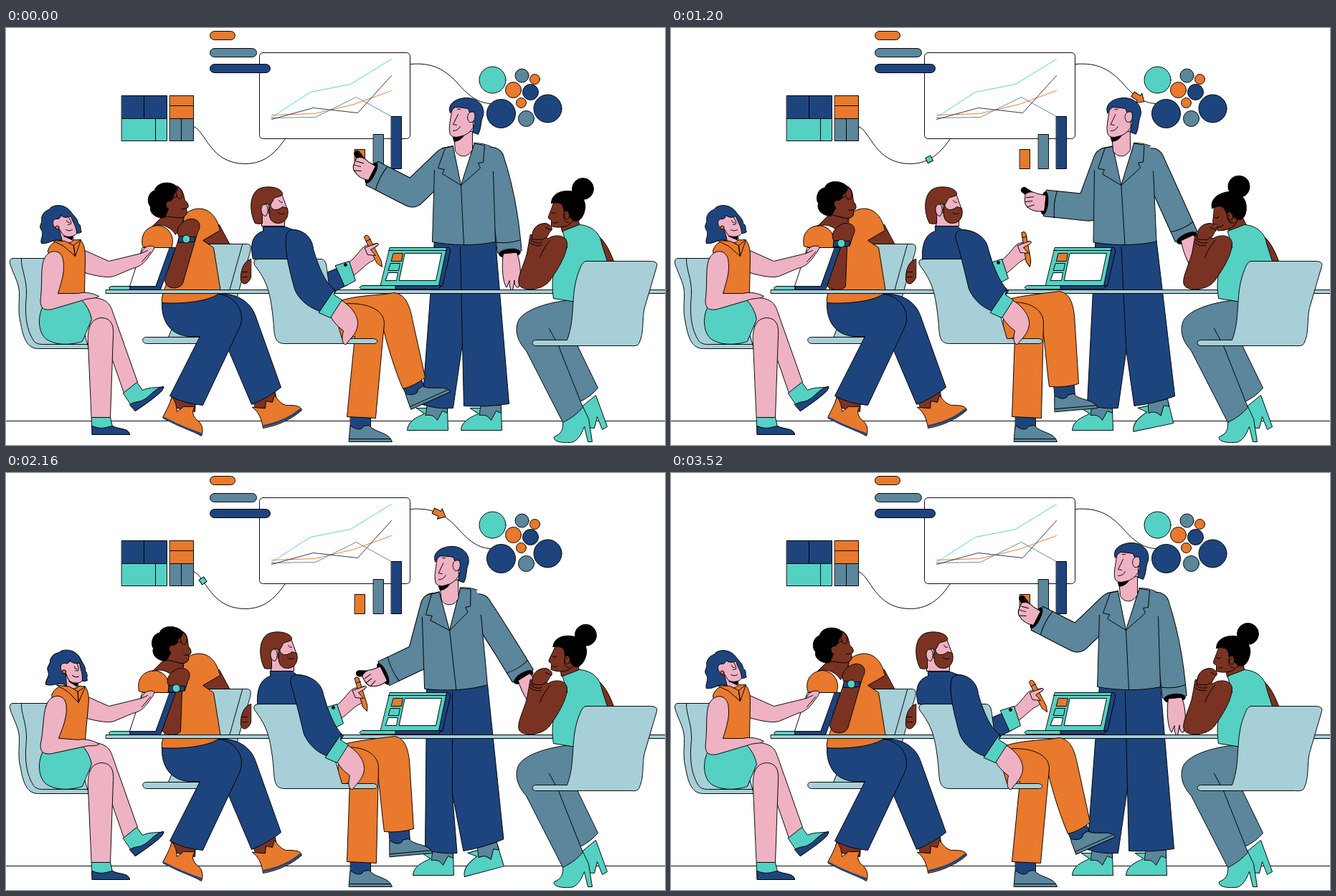
These frames come from a looping animation (919x582 px, 3600 ms). An HTML page:

```html
<!DOCTYPE html>
<html lang="en">
<head>
<meta charset="utf-8">
<title>Meeting</title>
<style>
html, body { margin: 0; height: 100%; overflow: hidden; background: #fff }
svg { display: block; width: 100vw; height: 100vh; stroke: #000; stroke-width: .95; stroke-linejoin: round; stroke-linecap: round }
.n { fill: #1e447d } .t { fill: #54d1c3 } .o { fill: #e8792d } .s { fill: #5b869b }
.c { fill: #a7cfd7 } .p { fill: #eeb2c3 } .b { fill: #7a3322 } .k { fill: #000 } .w { fill: #fff }
.l { fill: none } .x { stroke: none }
.sleeve { fill: none }
.sleeve path + path { stroke: #5b869b }
</style>
</head>
<body>
<svg viewBox="-.5 -.5 919 582">
<defs>
  <g id="shoe">
    <path class="n" d="M-14 -6H14V16H-14Z"/>
    <path class="s" d="M-15 14L-14 9C-8 15 2 17 4 10L12 9C20 20 40 18 44 32H-16Z"/>
    <path class="l" d="M-16 28H41"/>
  </g>
  <g id="flat">
    <path class="t" d="M-28 0H15L16 31H-41C-40 18 -28 13 -17 8Z"/>
    <path class="s" d="M-13 -4H15V7L8 4L1 17C-3 12 -5 9 -15 10Z"/>
  </g>
</defs>
<path d="M-1 548H919"/>

<!-- charts -->
<rect class="w" x="353" y="34" width="210" height="120" rx="5"/>
<rect class="o" x="284" y="4" width="35" height="12" rx="6"/>
<rect class="s" x="284" y="28" width="65" height="12" rx="6"/>
<rect class="n" x="284" y="50" width="84" height="12" rx="6"/>
<g class="l">
  <path stroke="#54d1c3" d="M370 124L424 89L480 78L537 43"/>
  <path stroke="#e8792d" d="M370 121L430 119L485 106L537 87"/>
  <path stroke="#5b869b" d="M370 125L431 124L488 96L537 123"/>
  <path stroke="#2b2f55" d="M370 127L428 111L490 118L537 66"/>
  <path id="track1" d="M261 137C278 143 284 189 333 189C362 189 377 171 389 154"/>
  <path id="track2" d="M563 50C596 47 612 59 627 74C642 91 655 104 675 105"/>
</g>
<path class="o" d="M486 169h14v27h-14z"/>
<path class="s" d="M512 148h14v48h-14z"/>
<path class="n" d="M537 123h14v73h-14z"/>
<path class="n" d="M161 94h63v32h-63zM192 94v32"/>
<path class="t" d="M161 126h63v31h-63zM208 126v31"/>
<path class="o" d="M228 94h33v32h-33zM228 108h33"/>
<path class="s" d="M228 126h33v31h-33zM244 126v31"/>
<g class="n"><circle cx="690" cy="119" r="20"/><circle cx="755" cy="112" r="19.5"/><circle cx="731" cy="89" r="11"/></g>
<g class="o"><circle cx="737" cy="71" r="7"/><circle cx="707" cy="86" r="11"/><circle cx="718" cy="104" r="7"/></g>
<g class="s"><circle cx="719" cy="66" r="9.5"/><circle cx="725" cy="126" r="11"/></g>
<circle class="t" cx="678" cy="72" r="18.500"/>
<path id="box" class="t" d="M-4 -4h8v8h-8z"/>
<path id="arrow" class="o" d="M-9 -4H1V-8L10 0L1 8V4H-9Z"/>

<!-- presenter -->
<use id="flatL" href="#flat"/><use id="flatR" href="#flat"/>
<path id="pants" class="n"/>
<g id="armL"><g class="sleeve"><path stroke-width="38"/><path stroke-width="36"/></g>
  <g class="end">
    <path class="s" d="M-15 -18.500H0Q4 0 0 18.500H-15Q-11 0 -15 -18.500Z"/>
    <ellipse class="k" cx="1" rx="5" ry="16"/>
    <path class="k" stroke-width="9" d="M17 8L31 15"/>
    <path class="p" d="M0 -11C10 -14 18 -12 24 -8C30 -4 28 4 29 9C24 15 18 14 12 12L0 11Z"/>
    <path class="l" d="M28 -1L18 1M27 5L17 7M24 -8L15 -4"/>
  </g>
</g>
<g id="armR"><g class="sleeve"><path stroke-width="35"/><path stroke-width="33"/></g>
  <g class="end">
    <path class="s" d="M-15 -17H0Q4 0 0 17H-15Q-11 0 -15 -17Z"/>
    <ellipse class="k" cx="2" rx="6" ry="15"/>
    <path class="p" d="M2 -10C20 -15 38 -12 50 -8C52 -3 44 -2 40 -3L54 1C55 5 44 5 40 4L49 9C44 13 22 14 2 9Z"/>
  </g>
</g>
<g id="jacket">
  <path class="w x" d="M622 165L634 219L653 160Z"/>
  <path class="s x" d="M610 167L623 164L634 219L652 160L674 164C679 175 679 185 679 200L682 298C655 304 620 303 594 298L597 200C597 185 603 178 610 167Z"/>
  <path class="l" d="M597 198L594 298C620 303 655 304 682 298L679 200M608 167L623 164M652 160Q666 160 676 165M634 219L638 302"/>
  <path class="s" d="M612 167L602 195L611 197L608 203L634 219L623 165ZM653 161L667 163L665 187L658 188L661 195L634 219Z"/>
</g>
<g id="head">
  <path class="p" d="M624 148L626 171C632 182 645 180 650 169V144Z"/>
  <path class="k" d="M623 152Q635 150 640 145Q637 156 625 158Z"/>
  <path class="p" d="M622 110C620 125 617 135 618 143C618 152 626 153 632 151Q645 149 651 138V110Z"/>
  <path class="n" d="M619 118C614 105 628 97 642 97C656 97 668 107 665 122C661 130 663 138 658 148L650 145L653 132C648 122 646 118 644 112Q632 110 626 110Q621 113 619 118Z"/>
  <path class="p" d="M652 117C644 114 640 125 646 131C654 133 655 120 652 117Z"/>
  <path class="l" d="M630 120L623 134L628 135M623 143Q630 143 633 137M629 113l4 0"/>
</g>

<!-- man in the orange shirt -->
<path class="b" d="M268 285L297 274L313 304H280Z"/>
<path class="c" d="M276 301H336C342 302 341 306 340 312L323 370C316 410 305 432 290 440H196C189 440 188 431 195 431H226L250 372Z"/>
<path class="l" d="M329 302L310 370M226 431H290"/>
<path class="b" d="M341 322C330 325 326 340 327 352C331 361 338 355 341 348ZM328 340l8 0M329 347l7 0"/>
<path class="b" d="M343 515L375 508L378 526L348 532ZM232 510L264 520L263 535L228 528Z"/>
<g class="o">
  <path d="M231 514C228 525 222 535 218 543C235 552 260 562 272 569C276 560 272 550 265 546C260 540 258 535 263 528L247 528L238 535Q238 524 231 514Z"/>
  <path d="M343 529C352 535 356 545 358 558C375 555 395 548 412 533C411 526 400 526 390 526C383 524 378 518 374 512L371 522L362 520L361 530Z"/>
</g>
<path class="l" stroke="#1e447d" stroke-width="3" d="M220 544Q245 557 271 566M359 555Q390 549 410 532"/>
<path class="n" d="M290 371C322 368 340 382 347 400L383 501Q365 516 342 525L306 440Z"/>
<path class="n" d="M217 383C216 405 226 428 255 430L270 430L228 513Q248 524 274 526L325 418C336 393 315 372 296 371Z"/>
<path class="o" d="M217 383C214 370 232 340 243 306L248 260C264 246 290 247 298 282L274 296L289 306L299 368C285 382 240 385 217 383Z"/>
<path id="sleeve2" class="o" d="M190 304C186 286 197 276 211 275C224 276 232 286 232 298L230 310Z"/>
<path class="b" d="M204 276L224 256L247 262C246 276 240 282 236 288C228 276 216 272 204 276Z"/>
<path class="b" data-move="man2" d="M241 293L263 297L246 356C240 366 222 364 221 352Z" data-to="M228 302L245 304L243 360C238 368 217 366 216 356Z"/>
<g id="fist2">
  <path class="b" d="M241 291C233 280 246 268 256 266C268 265 273 274 267 284L263 297Z"/>
  <path class="n" d="M241 290L263 291L262 298L240 299Z"/>
  <circle class="t" cx="251" cy="294" r="5.500"/>
</g>
<g id="head2">
  <path class="b" d="M222 240C222 230 230 222 238 220C246 224 247 232 249 240C256 246 254 250 251 252C254 262 246 266 236 264L220 262Z"/>
  <path class="k" d="M234 218C222 212 208 218 207 226C196 230 196 244 201 249C199 260 212 266 221 264L226 252C220 248 222 240 229 241C234 238 232 230 238 226Q239 220 234 218Z"/>
  <path class="l" d="M231 238L238 234M239 222C246 222 248 236 242 238C236 237 235 226 239 222M244 252Q248 253 251 251"/>
</g>

<rect class="c" x="139" y="365" width="785" height="5"/>

<!-- laptops -->
<path class="w" d="M190 306H230L214 361H172Z"/>
<path class="n" d="M228 306H236L215 365H172V360H208Z"/>
<path class="t" d="M172 360H146Q141 362 145 365H172Z"/>
<path class="n" d="M612 306H617Q620 308 619 312L608 360H600Z"/>
<path class="t" d="M535 306H614L603 359H522Z"/>
<path class="w" d="M556 314H607L599 352H548ZM533 341H546L544 352H529Z"/>
<path class="o" d="M540 314H553L551 325H537Z"/>
<path class="l" d="M536 328H549L547 338H533ZM533 310H614"/>
<path class="t" d="M543 359H496Q490 362 495 364H543Z"/>
<path class="n" d="M543 359H606L603 364H543Z"/>

<!-- woman on the left -->
<path class="c" d="M9 321H78L115 447H45C30 447 24 435 20 412C16 395 18 390 18 370C18 355 10 345 5 328Q4 321 9 321Z"/>
<path class="l" d="M21 321C20 335 29 350 28 372C25 400 28 420 38 436Q42 441 50 441H115"/>
<path class="p" d="M107 309L143 325L188 314C190 308 195 302 205 304C209 306 203 312 196 322C190 330 182 334 176 335L150 346C140 349 120 345 100 338ZM188 314l9 -4M189 326l12 -14"/>
<path class="p" d="M80 380C130 370 143 378 148 395L183 494L164 509L140 440Z"/>
<path class="t" d="M54 383C42 400 44 425 56 434C70 443 90 442 106 437L119 406Q116 390 104 378Z"/>
<path class="p" d="M114 440C112 415 120 404 134 404C146 405 150 414 149 428L145 543H119Z"/>
<path class="t" d="M119 543H145L148 556C158 560 171 558 172 567H120ZM163 509L182 494L190 505C200 500 213 502 219 500C221 505 205 517 180 534Z"/>
<path class="n" d="M120 555C133 561 140 556 148 555C158 560 171 558 172 567H120ZM172 525C180 520 185 522 190 519C200 515 205 503 219 500C221 505 205 517 180 534Z"/>
<g id="torso">
  <path class="o" d="M58 310C62 298 72 295 82 296L103 295C108 300 110 308 110 318L109 371H70Z"/>
  <g id="head1">
    <path class="n" d="M49 300C46 294 54 288 48 280C45 274 51 272 49 265C52 252 60 255 62 250C72 244 84 248 90 256C94 262 100 266 100 272C106 276 102 280 105 284C98 289 92 284 90 280L78 297C68 291 60 302 49 300Z"/>
    <path class="p" d="M72 274L78 297Q88 303 94 295L91 282Z"/>
    <path class="k" d="M80 290Q86 292 92 290V295Z"/>
    <path class="p" d="M70 266C62 266 64 279 72 279C76 280 76 287 82 290C88 292 96 290 98 286C98 276 92 270 90 262Q82 266 76 261Q75 267 70 266Z"/>
    <circle class="o" cx="71" cy="278" r="2.500"/>
    <path class="l" d="M84 268q1 4 4 3M87 264q4 6 3 9l-4 1M83 281q5 3 9 0"/>
  </g>
  <path class="o" d="M64 296L82 297L94 303L96 318L80 304ZM94 303L104 295L96 318Z"/>
  <path class="p" d="M51 327C55 308 75 306 79 322C82 338 78 350 72 370L100 370C110 367 122 370 129 374C124 378 115 376 108 379L64 392C50 395 46 388 48 375C50 355 48 340 51 327Z"/>
</g>

<!-- man with the pencil -->
<g id="forearm3">
  <path class="n" d="M444 342L468 332L476 358L456 368Z"/>
  <path class="p" d="M476 328C490 318 494 306 502 303L517 300C523 302 512 306 510 309C522 315 515 323 508 326C500 330 492 340 484 345Z"/>
  <g id="pen"><path class="o" d="M499 291Q501 287 505 290L523 325L524 333L517 328Z"/><path class="l" d="M502 297l6 -3"/></g>
  <path class="p" d="M500 306L517 300C523 302 512 306 508 309L515 317L504 316Z"/>
  <path class="t" d="M459 331L478 325L487 352L472 360Z"/>
  <circle class="k" cx="473" cy="330" r="2"/>
</g>
<use id="shoe3" href="#shoe"/><use href="#shoe" x="494" y="545"/>
<path class="o" data-move="man3" d="M466 380C490 372 520 373 541 369C556 371 562 385 566 405L584 487Q570 499 553 503C543 480 530 440 523 408Z" data-to="M470 378C494 372 520 370 541 367C556 369 560 385 562 400L568 496Q548 502 527 500C524 480 521 440 517 412Z"/>
<path class="o" data-move="man3" d="M462 386C490 380 527 388 527 412L515 544L475 542L486 430L462 440Z" data-to="M464 384C490 378 518 388 519 410L516 544L475 542L479 430L462 440Z"/>
<g id="head3">
  <path class="p" d="M356 252V276H388V258Z"/>
  <path class="p" d="M366 240L384 231L391 250L380 258H366Z"/>
  <path class="b" d="M347 272C339 258 338 232 352 224C362 219 382 221 385 230C386 236 375 234 373 238L368 247L362 244L357 262V272Q352 274 347 272Z"/>
  <path class="b" d="M368 246C370 256 380 254 385 249L392 251C395 264 388 272 379 272C368 272 364 262 368 246Z"/>
  <path class="p" d="M363 246C353 242 353 262 362 262Q367 254 363 246Z"/>
  <path class="l" d="M379 257q5 4 9 1M380 240q2 4 5 3"/>
</g>
<path class="n" data-move="man3" d="M358 277H389L400 281C416 282 424 292 430 322H344C339 300 344 287 358 283Z" data-to="M368 276H398L405 281C430 282 438 296 446 322H350C349 300 355 287 368 283Z"/>
<path class="c" d="M352 322H440C446 324 446 330 447 336C450 360 455 390 460 405L468 433H512C519 434 519 440 512 440H388C372 440 374 425 372 405C368 370 365 355 346 330Q343 322 352 322Z"/>
<path class="n" data-move="man3" d="M400 281C418 282 427 295 428 308C436 335 446 358 460 366L441 396C425 392 408 380 402 364C394 335 388 310 390 292Q390 282 400 281Z" data-to="M405 281C428 282 440 295 442 308C448 330 458 356 470 366L452 396C436 392 422 380 415 364C408 335 402 310 396 292Q396 282 405 281Z"/>
<g id="hand3">
  <path class="p" d="M466 379C482 388 491 402 490 414C488 428 478 434 474 441C467 442 468 430 470 422C462 416 456 410 452 402Z"/>
  <path class="t" d="M458 364L457 372L468 379L452 404L436 397Z"/>
</g>

<!-- woman on the right -->
<path class="b" d="M826 290Q838 300 847 325H828Z"/>
<g class="t">
  <path d="M800 530L822 512L838 556L831 560L824 542L820 558L806 557Z"/>
  <path d="M776 548L803 526L812 545L817 577H811L806 556C802 566 796 578 786 578C770 579 762 575 764 570C774 566 777 560 776 548Z"/>
</g>
<path class="s" d="M754 415L790 522L800 521Q815 514 825 502L795 440Z"/>
<path class="s" d="M795 379C760 380 722 392 714 408C707 425 716 440 725 450L776 550Q793 542 804 529L770 443H800Z"/>
<path class="l" d="M757 419L770 443"/>
<g id="head5">
  <circle class="k" cx="804" cy="224" r="15"/>
  <path class="b" d="M771 262L775 284L800 279L796 258Z"/>
  <path class="b" d="M764 240C760 255 755 262 756 265L760 268L760 276C768 279 782 278 787 272L797 262L790 245Z"/>
  <path class="k" d="M760 244C760 232 772 226 785 227C800 228 809 240 807 252C805 264 798 272 790 268Q786 262 782 263C776 260 779 250 774 245Q768 242 760 244Z"/>
  <path class="b" d="M783 255C775 253 776 264 782 267Q788 262 783 255Z"/>
  <path class="l" d="M781 258C774 262 778 272 785 271M760 257q4 3 6 0M762 271q5 2 7 -1"/>
</g>
<path class="t" d="M776 283L799 274C815 275 828 285 830 300L838 325L795 382L763 377C758 345 766 320 782 306Z"/>
<path class="b" d="M731 288L756 293C765 287 781 288 782 300C782 315 770 335 758 352C748 366 720 368 715 358C711 350 722 330 726 314Z"/>
<path class="b" d="M733 294C732 280 740 272 752 272C760 274 764 280 758 284L754 291L747 295Z"/>
<path class="l" d="M730 294Q737 302 747 299M729 298Q736 305 746 303M752 278l7 3M758 296Q748 308 744 320"/>
<path class="c" d="M808 325H900Q909 326 907 332L890 390C886 405 890 425 882 440Q880 444 870 443H738C732 442 732 436 738 435H782C795 400 785 370 800 335Q803 326 808 325Z"/>
</svg>
<script>
const LOOP = 3600;
const $ = id => document.getElementById(id);
const clamp = u => Math.min(1, Math.max(0, u));
const mix = (a, b, k) => a + (b - a) * k;
const deg = (y, x) => Math.atan2(y, x) * 180 / Math.PI;
const place = (id, x, y, turn = 0, px = 0, py = 0) =>
  $(id).setAttribute('transform', `translate(${x} ${y}) rotate(${turn} ${px} ${py})`);

const ease = (t, from, to) => {
  const u = clamp((t - from) / (to - from));
  return u * u * (3 - 2 * u);
};
// Eases from 0 to 1 between a and b, and back between c and d.
const pulse = (t, a, b, c, d) => ease(t, a, b) - ease(t, c, d);

const NUMBER = /-?[\d.]+/g;
const morphs = [...document.querySelectorAll('[data-to]')].map(el => ({
  el, from: el.getAttribute('d'), to: el.dataset.to.match(NUMBER), move: el.dataset.move
}));

function limb(id, sx, sy, curve, ex, ey, cx, cy) {
  for (const path of $(id).querySelectorAll('.sleeve path'))
    path.setAttribute('d', `M${sx} ${sy}${curve}${ex} ${ey} ${cx} ${cy}`);
  const angle = deg(cy - ey, cx - ex), end = $(id).querySelector('.end');
  end.setAttribute('transform', `translate(${cx} ${cy}) rotate(${angle}) translate(17 0)`);
}

function travel(id, trackId, u, start) {
  const track = $(trackId), d = track.getTotalLength() * mix(start, 1, clamp(u));
  const a = track.getPointAtLength(d - 1), p = track.getPointAtLength(d), b = track.getPointAtLength(d + 1);
  $(id).style.display = u < 0 || u > 1 ? 'none' : '';
  place(id, p.x, p.y, deg(b.y - a.y, b.x - a.x));
}

function drawPresenter(t) {
  const lower = pulse(t, 0, 720, 2480, 2880);
  const sway = pulse(t, 720, 1840, 1840, 2880);
  const reach = pulse(t, 720, 1840, 1840, 2480);
  const point = pulse(t, 1840, 2480, 2480, 2880);
  const step = pulse(t, 1840, 2480, 2880, 3520);

  const turn = -2 * sway - 4 * point, shift = -14 * sway;
  const tilt = turn * -2; // sideways travel of the shoulders
  place('jacket', shift, 0, turn, 638, 300);
  place('head', -25 * sway, 5 * pulse(t, 1200, 1840, 2480, 2880), -2 * sway, 638, 170);
  limb('armL', 614 + shift - tilt, 185 + point, 'L',
    566 + 24 * lower - 18 * sway + 3 * point, 231 + 15 * lower + 11 * sway + point,
    525 + 15 * lower - 5 * sway + 11 * point, 210 + 27 * lower + 22 * sway + 36 * point);
  limb('armR', 677 + shift - tilt, 183 + 3 * sway, 'Q',
    694 - 8 * reach - 4 * point, 235 - 11 * reach,
    700 + 28 * reach - 5 * point, 295 - 50 * reach - 4 * point);

  const ax = 580 + 8 * step, bx = 623 + 11 * step;
  const kx = 636 - 4 * reach - 24 * point, ky = 440 + 25 * reach - 10 * point;
  const cx = 638 + 19 * reach - 20 * point;
  const dx = 701 + 3 * reach - 18 * point, dy = 524 - 27 * reach;
  $('pants').setAttribute('d', `M${597 + shift} 296L${ax} 525Q${(ax + bx) / 2} 532 ${bx} 530L${kx} ${ky}L${cx} 527` +
    `Q${(cx + dx) / 2} ${dy / 2 + 267} ${dx} ${dy}L${682 + shift} 296ZM${633 + shift} 305L${kx} ${ky}`);
  place('flatL', 600 + 16 * step, 530);
  place('flatR', 675 + 8 * reach - 17 * point, 530 - 15 * reach, -30 * reach);
}

function draw(t) {
  const u = (t % 1840 - 160) / 1400;
  travel('box', 'track1', u, 0);
  travel('arrow', 'track2', u, .23);
  drawPresenter(t);

  const moves = {
    man2: pulse(t, 720, 1200, 2880, 3520),
    man3: pulse(t, 0, 720, 2400, 2880)
  };
  for (const { el, from, to, move } of morphs) {
    let i = 0;
    el.setAttribute('d', from.replace(NUMBER, n => mix(+n, +to[i++], moves[move])));
  }

  const { man2, man3 } = moves;
  place('fist2', -14 * man2, 6 * man2);
  place('sleeve2', -5 * man2, 0);
  place('head2', 2 * man2, -man2, 8 * man2, 230, 262);

  place('head3', 13 * man3, 0);
  place('forearm3', -17 * man3, -3 * man3);
  place('hand3', 9 * man3, 0);
  place('pen', 0, 0, 3 * man3 + 14 * pulse(t, 720, 1200, 1840, 2480), 511, 311);
  place('shoe3', mix(566, 548, man3), mix(496, 502, man3), mix(-24, -5, man3));

  const lean = pulse(t, 1200, 2480, 2880, 3520);
  place('torso', 0, 0, 5 * lean, 75, 382);
  place('head1', 0, 0, 7 * lean, 84, 295);

  const nod = 5 * pulse(t, 1200, 1840, 2880, 3520) - 15 * pulse(t, 0, 720, 1200, 1840);
  place('head5', 0, 0, nod, 785, 270);
}

const begin = performance.now();
function tick() {
  draw((performance.now() - begin) % LOOP);
  requestAnimationFrame(tick);
}
tick();
</script>
</body>
</html>
```
